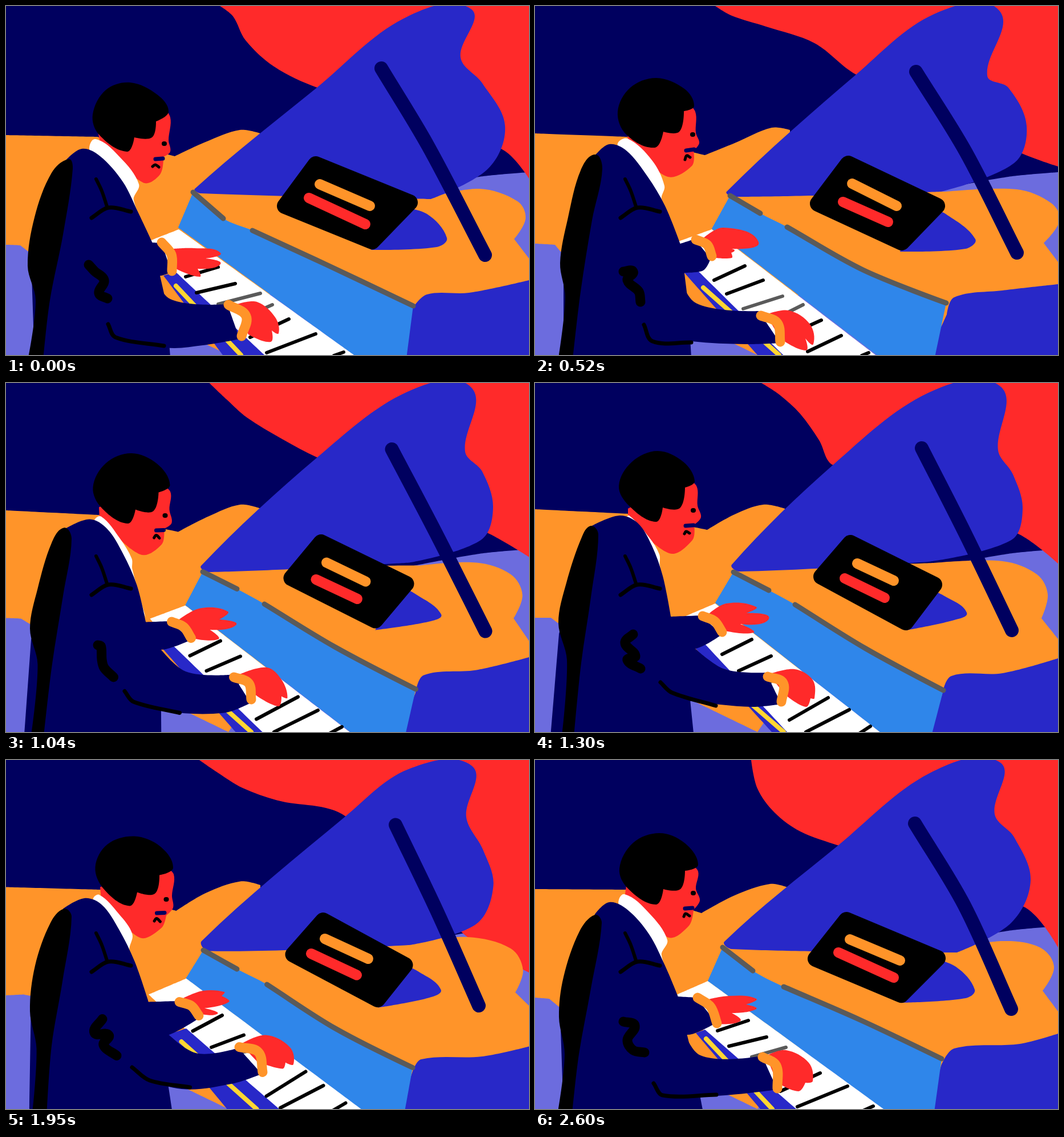
Animation of 917 by 611 pixels, one loop 2730 ms. Source, as an HTML page with a canvas:

```html
<!DOCTYPE html>
<html>
<head>
<meta charset="utf-8">
<title>Pianist</title>
<style>
html, body { margin: 0; width: 100%; height: 100%; overflow: hidden; background: #00005f }
canvas { display: block }
</style>
</head>
<body>
<canvas id="stage" width="917" height="611"></canvas>
<script>
const ctx = document.getElementById('stage').getContext('2d');
const STEP = 130, STEPS = 21;
const keys = [0, 4, 6, 10, 13, 17, 20]; // steps at which the poses stand
const navy = '#00005f', red = '#ff2a2a', lilac = '#6c6cde', orange = '#ff9429', blue = '#2828c8',
  sky = '#2f86ea', grey = '#5a5a5a', yellow = '#ffd632', white = '#fff', black = '#000';
const shapes = [];

// One string of points per pose; "!" in the first pose marks a sharp corner.
function add(color, kind, width, poses) {
  shapes.push({
    color, kind, width,
    sharp: poses[0].split(' ').map(p => p.endsWith('!')),
    poses: poses.map(s => s.split(' ').map(p => p.split(',').map(parseFloat)))
  });
}
const fill = (color, ...poses) => add(color, 'fill', 0, poses);
const line = (color, width, ...poses) => add(color, 'line', width, poses);
const slab = (color, width, ...poses) => add(color, 'slab', width, poses);
const part = (poses, from, to) => poses.map(s => s.split(' ').slice(from, to).join(' '));

// Room
fill(lilac, '715,320! 830,299 917,291! 917,611! 0,611! 0,400!');
fill(red,
  '375,0! 398,18 420,60 470,106 546,143 868,250 917,302! 917,0!',
  '316,0 345,17 405,36 490,65 563,120 851,257 917,281 917,0',
  '316,0 345,37 380,67 470,96 569,117 842,261 917,293 917,0',
  '397,0 428,20 465,54 498,100 523,144 845,263 917,316 917,0',
  '382,0 430,16 480,38 540,65 592,99 806,298 917,341 917,0',
  '296,0 312,28 350,60 410,76 600,99 800,312 917,403 917,0',
  '379,0 390,50 420,92 465,125 533,150 857,257 917,328 917,0');
fill(orange, '200,450! 500,450! 390,611! 270,553!');
fill(orange,
  '0,226! 160,229! 296,263! 350,238 410,217 446,223! 450,470! 42,432! 25,419! 0,418!',
  '0,223 160,229 298,261 350,240 415,213 447,217 450,470 45,430 35,418 0,416',
  '0,225 160,233 302,264 360,237 420,213 454,219 450,470 44,424 25,414 0,412',
  '0,221 165,229 302,257 350,230 400,213 438,220 450,470 40,420 28,411 0,411',
  '0,221 165,227 302,260 350,230 410,208 452,215 450,470 40,410 36,406 0,408',
  '0,224 165,227 295,268 350,236 412,217 440,223 450,470 42,415 25,415 0,416',
  '0,226 160,227 292,268 350,237 412,217 443,223 450,470 42,432 25,418 0,416');

// Piano
fill(orange,
  '325,327! 560,320! 745,335! 830,320 897,342 911,372 891,408! 917,442! 917,560! 700,560!',
  '340,332 560,320 720,325 845,321 905,345 920,375 892,415 917,448 917,560 700,560',
  '342,330 560,320 752,324 830,317 890,335 912,372 892,412 917,455 917,560 700,560',
  '350,330 560,320 700,315 820,312 880,335 899,370 888,412 917,448 917,560 700,560',
  '350,334 560,320 680,318 810,307 885,330 903,370 893,410 917,435 917,560 700,560',
  '338,331 560,320 740,320 810,313 885,330 910,365 893,404 917,425 917,560 700,560',
  '328,328 560,320 720,332 820,317 885,328 910,362 890,404 917,440 917,560 700,560');
fill(blue,
  '331,320 545,143 697,22 815,5 797,90 835,135 875,210 845,285 745,338! 342,328',
  '336,325 563,120 700,14 814,8 793,122 830,143 862,210 840,275 712,325 350,334',
  '339,322 569,117 715,15 815,9 798,122 832,150 853,215 830,275 725,316 352,332',
  '345,318 523,143 690,17 816,6 812,118 838,160 855,220 835,275 690,313 358,330',
  '348,318 592,99 715,9 817,7 808,115 838,165 852,225 828,280 690,318 358,338',
  '338,316 600,97 694,24 817,14 806,85 835,150 857,215 820,295 725,330 352,331',
  '332,318 531,150 692,23 815,4 806,95 840,135 869,210 835,285 740,337 345,331');
fill(blue,
  '640,427! 755,422 773,406 738,364 690,352!',
  '640,430 755,425 772,408 720,364 690,352',
  '645,432 750,420 769,408 715,364 690,350',
  '650,433 735,415 757,402 718,373 690,360',
  '650,432 735,412 756,398 715,376 690,360',
  '655,435 750,420 769,406 730,364 690,350',
  '640,425 755,417 771,402 738,362 690,345');
slab(black, 28,
  '543,277! 708,344! 642,412! 489,350!',
  '549,276 705,350 643,414 496,346',
  '552,278 703,350 645,412 499,344',
  '553,280 700,353 650,419 502,339',
  '559,280 703,358 650,417 507,337',
  '553,282 696,360 653,421 500,344',
  '546,280 706,347 642,411 492,348');
line(orange, 18, '550,312 638,350', '556,311 634,350', '559,313 632,349', '565,316 629,346',
  '566,314 630,346', '552,312 640,350', '552,314 640,351');
line(red, 18, '531,336 630,382', '540,343 619,378', '544,346 619,380', '543,342 613,376',
  '540,340 603,371', '530,338 627,382', '532,337 629,381');
line(navy, 24, '658,109 740,245 840,436', '668,115 755,255 845,432', '675,118 755,265 845,436',
  '678,114 755,265 836,433', '681,116 757,265 830,432', '685,111 757,270 828,428', '666,111 753,255 835,436');
fill(blue,
  '712,530! 738,505 812,502 917,480! 917,611! 690,611!',
  '722,540 735,510 820,498 917,487 917,611 690,611',
  '722,540 735,510 830,497 917,478 917,611 690,611',
  '714,545 730,513 820,508 917,482 917,611 690,611',
  '717,548 728,531 830,525 917,505 917,611 690,611',
  '708,545 728,517 840,513 917,498 917,611 690,611',
  '712,535 735,505 850,497 917,479 917,611 690,611');
const front = [
  '328,326! 381,372 432,393 560,452 714,525! 703,611! 610,611! 302,388!',
  '342,332 395,363 442,387 575,462 721,520 702,611 600,611 310,390',
  '342,330 400,358 450,386 575,460 721,534 706,611 603,611 313,393',
  '348,331 410,363 456,388 580,465 716,538 697,611 605,611 316,385',
  '352,334 412,366 458,391 575,470 716,543 703,611 628,611 320,383',
  '340,332 398,366 457,395 580,470 710,534 697,611 617,611 311,382',
  '329,328 382,369 436,397 570,455 713,523 701,611 611,611 303,387'];
fill(sky, ...front);
line(grey, 9, ...part(front, 0, 2));
line(grey, 9, ...part(front, 2, 5));

// Keyboard
fill(white,
  '252,411! 303,391! 610,611! 452,611! 290,462!',
  '252,412 310,391 597,611 435,611 285,465',
  '250,413 313,393 600,611 455,611 290,468',
  '255,412 316,386 605,611 440,611 298,458',
  '250,411 320,382 628,611 478,611 312,468',
  '250,410 312,383 617,611 477,611 318,475',
  '248,411 303,387 611,611 457,611 295,472');
fill(blue,
  '276,472! 298,466! 453,611! 380,611!', '260,465 285,463 435,611 390,611',
  '270,468 292,466 457,611 390,611', '280,463 298,457 442,611 415,611',
  '286,476 312,466 478,611 390,611', '274,487 320,474 480,611 385,611',
  '282,478 298,472 458,611 395,611');
line(yellow, 8, '298,490 412,611', '295,493 428,611', '297,494 424,611', '340,528 436,611',
  '305,492 437,611', '310,494 442,611', '300,488 416,611');
line(grey, 6, '372,522 446,503', '365,530 434,508', '400,525 415,520', '400,530 415,522',
  '405,515 420,510', '410,510 425,510', '380,520 440,503');
line(grey, 6, '440,535 467,523', '440,538 470,523', '440,520 460,520', '440,530 460,520',
  '455,510 475,510', '450,505 470,505', '440,530 455,522');
line(black, 6, '315,474 372,457', '314,480 368,455', '317,480 372,454', '328,475 380,449',
  '330,474 381,447', '325,475 377,447', '320,474 374,456');
line(black, 6, '334,502 402,486', '336,504 400,480', '346,504 408,479', '357,504 414,478',
  '360,503 419,480', '360,503 415,483', '340,501 406,485');
line(black, 6, '428,580 496,548', '440,578 502,550', '432,587 510,548', '446,590 514,551',
  '458,591 527,547', '455,586 524,544', '430,580 500,548');
line(black, 6, '457,607 543,574', '478,605 537,577', '465,611 543,574', '475,611 551,572',
  '482,611 558,570', '480,607 555,570', '460,607 548,571');
line(black, 6, '575,612 592,606', '573,612 585,607', '565,614 590,603', '568,614 588,601',
  '570,614 598,596', '575,614 593,605', '575,614 593,606');

// Head
fill(red,
  '160,215! 270,170! 288,195 285,235 288,255 276,264! 270,295 240,309 165,238!',
  '160,205 262,165 281,185 282,222 288,240 278,253 275,280 230,298 163,232',
  '163,215 275,190 293,200 288,228 290,255 275,262 270,290 235,302 165,237',
  '163,220 260,165 283,180 285,215 291,235 279,248 276,275 235,298 163,232',
  '165,220 275,180 294,195 291,235 294,255 282,262 275,285 235,304 166,237',
  '165,225 275,190 294,205 291,240 292,262 280,282 270,303 232,317 167,240',
  '160,220 270,180 286,195 282,225 289,246 278,262 270,290 232,310 158,235');
fill(black,
  '152,190 175,147 218,134 265,155 285,185 263,202! 256,230 225,230! 212,255 163,225',
  '145,185 167,143 213,126 262,145 279,175 261,184 253,220 225,220 210,248 160,225',
  '158,185 180,143 225,127 270,145 295,185 272,200 262,230 230,225 215,249 170,222',
  '147,180 170,138 215,119 260,138 280,172 263,183 254,219 224,218 212,243 165,215',
  '156,185 178,145 225,130 270,150 291,185 268,198 260,228 230,228 215,251 172,225',
  '157,190 178,150 225,137 270,152 295,192 270,205 262,240 230,235 218,260 172,228',
  '148,190 172,145 218,128 262,145 286,183 263,194 255,226 225,226 212,253 163,225');
line(black, 8, '277,241 278,241', '276,225 277,225', '280,241 281,241', '277,223 278,223',
  '280,238 281,238', '281,250 282,250', '277,233 278,233');
line(navy, 7, '262,268 275,267', '265,253 279,251', '263,266 275,266', '264,250 278,249',
  '265,263 279,262', '264,273 277,273', '263,260 276,259');
line(black, 5, '257,281 262,278 268,282', '263,269 266,262 272,265', '257,278 262,273 267,280',
  '262,264 265,260 271,263', '260,277 264,272 271,279', '260,287 264,283 270,287', '261,274 264,269 271,273');

// Shirt, jacket and chair
fill(white,
  '157,233 200,265 233,312 224,340 259,424! 190,310! 147,254',
  '162,232 205,270 227,315 222,338 257,437 190,310 145,244',
  '168,235 200,275 223,315 224,332 253,415 200,320 150,246',
  '165,232 200,270 218,300 219,320 237,405 200,310 160,240',
  '170,238 200,270 214,300 213,325 240,398 200,310 160,240',
  '157,234 195,268 229,310 220,342 234,393 190,310 146,250',
  '157,235 200,268 232,315 222,342 248,408 190,310 147,254');
fill(navy,
  '105,270! 133,250 165,263 205,308 232,362 257,415! 280,515! 288,611! 50,611! 45,470!',
  '105,262 130,242 160,253 197,298 228,350 256,420 268,515 274,611 50,611 50,470',
  '105,262 145,245 175,266 205,312 235,370 252,428 275,515 267,611 37,611 46,460',
  '100,250 148,232 180,245 205,285 224,338 238,408 268,515 278,611 28,611 42,440',
  '100,253 138,234 168,245 198,285 226,345 250,418 280,540 296,611 37,611 42,440',
  '100,268 137,250 168,262 198,308 225,360 247,420 280,540 286,611 45,611 45,460',
  '105,270 130,249 162,262 200,305 228,360 250,412 275,515 294,611 50,611 45,470');
fill(black,
  '110,268 80,292 50,370 38,455 52,515 40,611! 66,611! 77,515 100,400 117,285',
  '105,260 80,288 58,370 44,450 53,510 42,611 67,611 80,500 100,375 118,285',
  '105,257 78,290 56,370 43,440 55,500 42,611 65,611 80,500 102,370 119,280',
  '98,250 82,270 55,350 41,420 56,485 48,611 69,611 81,490 98,375 111,265',
  '100,254 78,280 50,360 42,420 54,500 54,611 77,611 80,500 100,375 114,268',
  '103,267 78,290 52,360 42,460 53,510 40,611 67,611 80,500 98,400 116,280',
  '105,271 78,300 50,380 42,450 52,515 41,611 66,611 77,515 98,400 117,285');

// Far arm
fill(red,
  '293,425! 330,424 376,432 350,442! 376,452 336,460! 340,474 298,460!',
  '293,408 330,388 392,413 345,425 350,428 344,432 345,441 308,440',
  '300,425 345,403 390,408 378,425 397,434 355,442 362,460 320,460',
  '300,408 335,386 388,392 370,403 410,413 360,422 383,437 325,432',
  '305,415 340,400 378,402 376,410 394,423 350,432 375,441 328,435',
  '318,418 350,408 388,410 380,416 388,424 345,437 366,448 338,450',
  '300,420 340,413 388,418 370,428 388,436 345,443 360,457 318,462');
fill(navy,
  '220,390! 255,414! 273,415! 290,466! 265,473 225,465!',
  '220,390 252,417 280,408 308,442 293,464 225,465',
  '220,390 253,428 285,427 320,460 272,468 225,470',
  '210,390 238,409 290,407 328,440 282,465 235,460',
  '220,390 252,426 300,418 338,440 289,478 240,475',
  '220,390 247,421 300,426 342,462 275,487 240,490',
  '220,390 250,414 283,416 318,460 275,480 235,480');
line(orange, 17, '273,414 290,435 291,464', '282,409 302,418 310,438', '287,428 308,437 321,457',
  '294,408 315,417 328,436', '303,420 322,425 335,437', '305,427 328,436 341,458', '285,416 308,432 319,461');

// Near arm
fill(red,
  '405,522! 440,518 472,545 478,573 466,568! 464,588 425,575!',
  '405,540 445,533 482,557 488,592 474,582 475,603 430,582',
  '410,510 460,495 480,520 497,550 483,545 480,565 427,540',
  '410,510 455,501 487,520 490,552 483,552 475,567 438,545',
  '415,492 460,481 498,500 508,532 498,532 492,544 440,530',
  '408,503 450,482 497,505 500,533 482,527 478,537 440,525',
  '405,518 440,508 480,530 487,562 474,565 462,580 425,565');
fill(navy,
  '255,460! 288,513 388,522! 410,583! 345,594 280,598 180,570!',
  '250,460 282,520 392,534 430,590 370,592 275,587 180,570',
  '260,460 300,510 390,514 426,558 385,588 290,593 180,560',
  '265,450 330,500 405,507 432,562 380,567 275,557 180,540',
  '265,455 332,502 407,497 444,550 400,560 295,564 190,540',
  '255,455 330,523 408,511 453,549 395,573 320,588 210,550',
  '255,455 290,517 398,518 425,577 345,586 285,588 190,570');
line(orange, 17, '390,523 421,543 413,578', '396,542 425,555 430,588', '391,516 416,526 428,550',
  '408,514 435,525 432,558', '408,495 441,508 446,545', '410,510 444,515 454,548', '399,520 423,535 425,575');

// Jacket creases and elbow patch
line(black, 6, '158,303 168,324 177,351');
line(black, 7, '150,371 180,353 219,360');
line(black, 17,
  '145,453 155,464 172,480 163,503 178,512', '155,465 172,465 162,480 182,500 185,518',
  '150,478 175,467 160,490 182,512 192,530', '172,440 158,455 176,478 162,485 185,500',
  '168,455 158,475 178,485 172,500 198,517', '170,452 152,480 182,478 170,498 190,518',
  '155,458 175,465 162,490 172,508 192,512');
line(black, 7, '179,557 192,580 277,595', '191,558 206,587 274,589', '196,555 207,574 292,590',
  '220,524 240,542 317,565', '221,538 242,550 313,562', '221,538 262,572 332,584', '208,566 224,587 318,586');

// Smooth curve through the points, with handles a third of each span long.
function trace(pts, sharp, closed) {
  const n = pts.length;
  const at = i => pts[closed ? (i + n) % n : Math.max(0, Math.min(n - 1, i))];
  const handle = (i, reach) => {
    const [x, y] = at(i);
    if (sharp[i % n]) return [x, y];
    const a = at(i - 1), b = at(i + 1), dx = b[0] - a[0], dy = b[1] - a[1];
    const k = reach / 3 / (Math.hypot(dx, dy) || 1);
    return [x + dx * k, y + dy * k];
  };
  ctx.beginPath();
  ctx.moveTo(...pts[0]);
  for (let i = 0; i < (closed ? n : n - 1); i++) {
    const p = at(i), q = at(i + 1), span = Math.hypot(q[0] - p[0], q[1] - p[1]);
    ctx.bezierCurveTo(...handle(i, span), ...handle(i + 1, -span), ...q);
  }
  if (closed) ctx.closePath();
}

function draw() {
  const step = Math.floor(performance.now() / STEP) % STEPS;
  let k = 0;
  while (k < keys.length - 2 && step >= keys[k + 1]) k++;
  const u = (step - keys[k]) / (keys[k + 1] - keys[k]);

  ctx.fillStyle = navy;
  ctx.fillRect(0, 0, 917, 611);
  ctx.lineCap = ctx.lineJoin = 'round';
  for (const { color, kind, width, sharp, poses } of shapes) {
    const from = poses[k] || poses[0], to = poses[k + 1] || poses[0];
    const pts = from.map((p, i) => p.map((v, j) => v + (to[i][j] - v) * u));
    trace(pts, sharp, kind !== 'line');
    ctx.fillStyle = ctx.strokeStyle = color;
    ctx.lineWidth = width;
    if (kind !== 'line') ctx.fill();
    if (kind !== 'fill') ctx.stroke();
  }
  requestAnimationFrame(draw);
}
draw();
</script>
</body>
</html>
```
